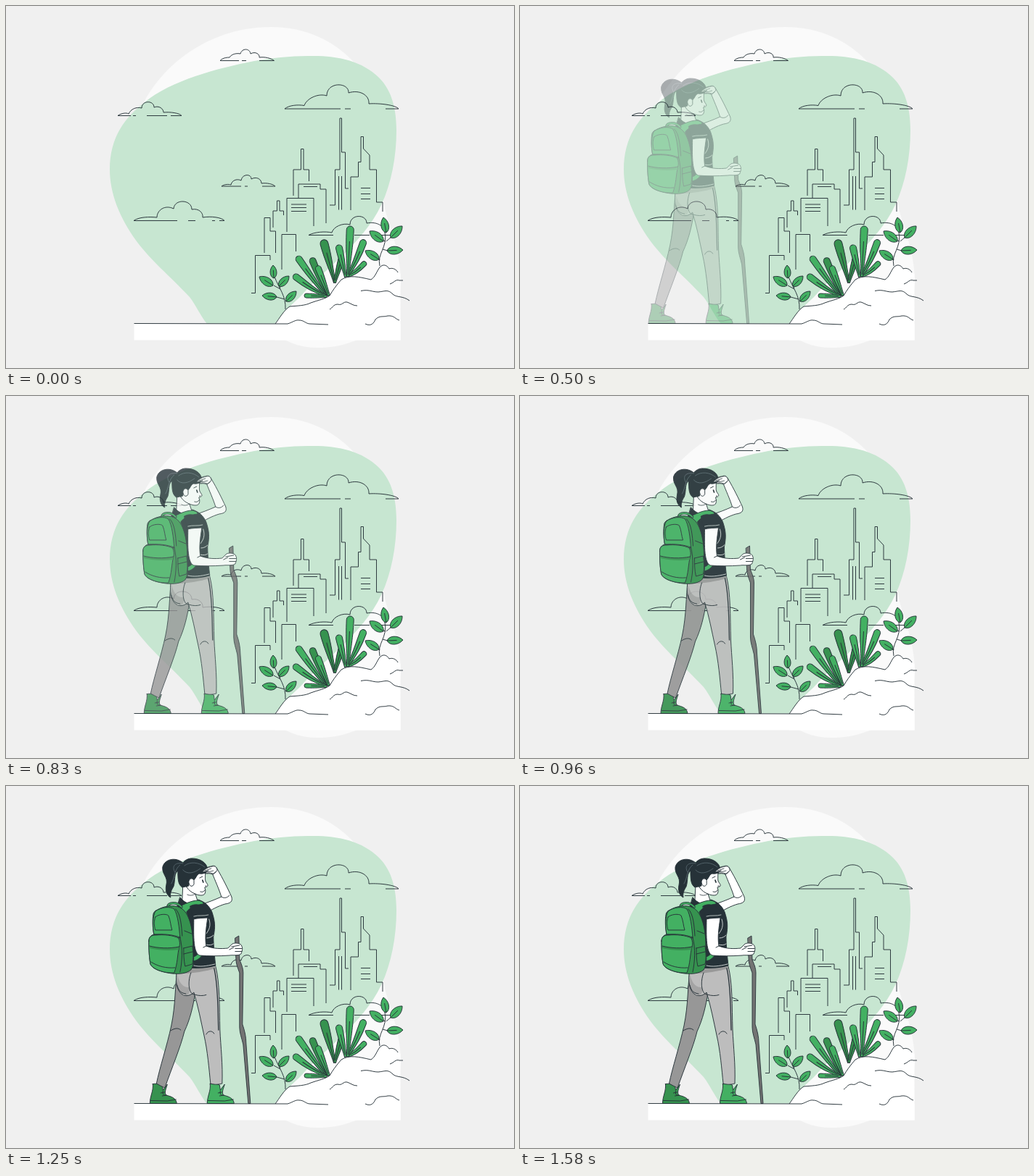
An HTML page with a canvas for the animation above (1620 ms loop, 700 by 500 pixels).

```html
<!DOCTYPE html>
<html lang="en">
<head>
<meta charset="utf-8">
<title>Hiker looking at the city</title>
<style>
html, body { margin: 0; width: 100%; height: 100%; overflow: hidden; background: #f0f0f0; }
canvas { display: block; width: 700px; height: 500px; }
</style>
</head>
<body>
<canvas id="stage" width="700" height="500"></canvas>
<script>
const INK = '#263238', GREEN = '#43b062', DEEP = '#36924f', SKIN = '#ffffff';
const LOOP = 1620, STEP = 1000 / 24, LAST = 38, SLIDE = 30;

function makeLayer() {
  const canvas = document.createElement('canvas');
  canvas.width = 700;
  canvas.height = 500;
  return canvas.getContext('2d');
}

function fill(c, d, color) {
  c.fillStyle = color;
  c.fill(new Path2D(d));
}

function line(c, d, color = INK, width = 0.95) {
  c.strokeStyle = color;
  c.lineWidth = width;
  c.stroke(new Path2D(d));
}

function shape(c, d, color, width = 0.95) {
  fill(c, d, color);
  line(c, d, INK, width);
}

// Pointed leaf with a midrib, from base to tip.
function leaf(c, bx, by, tx, ty) {
  const dx = tx - bx, dy = ty - by, k = 0.33;
  const point = (along, side) => `${bx + dx * along - dy * k * side} ${by + dy * along + dx * k * side}`;
  shape(c, `M${bx} ${by}C${point(0.15, 1)} ${point(0.7, 1)} ${tx} ${ty}` +
    `C${point(0.7, -1)} ${point(0.15, -1)} ${bx} ${by}Z`, GREEN);
  line(c, `M${bx} ${by}L${bx + dx * 0.62} ${by + dy * 0.62}`);
}

// Club-shaped blade with a round tip of radius r, bowed sideways by bend.
function blade(c, bx, by, tx, ty, r, bend = 0, color = GREEN) {
  const len = Math.hypot(tx - bx, ty - by), end = len - r;
  c.save();
  c.translate(bx, by);
  c.rotate(Math.atan2(ty - by, tx - bx));
  shape(c, `M0 -1.5C${len * 0.3} ${bend - 2} ${len * 0.5} ${bend - r} ${end} ${-r}` +
    `A${r} ${r} 0 0 1 ${end} ${r}C${len * 0.5} ${bend + r} ${len * 0.3} ${bend + 2} 0 1.5Z`, color);
  line(c, `M3 0Q${len * 0.4} ${bend} ${len * 0.7} ${bend * 0.5}`);
  c.restore();
}

function drawBackdrop(c) {
  c.fillStyle = '#f0f0f0';
  c.fillRect(0, 0, 700, 500);
  fill(c, 'M190 133C220 76 285 29 365 29C415 29 452 49 478 76C514 114 518 180 519 255' +
    'C520 295 541 320 544 375C546 432 492 472 430 472C408 472 393 466 380 459L250 350Z', '#fafafa');
  fill(c, 'M416 69C455 68 490 75 514 99C532 117 538 143 538 172C538 208 531 245 517 275' +
    'C493 327 437 365 405 402C389 416 379 428 370 439H277C268 428 261 412 253 402' +
    'C224 371 201 353 180 325C156 292 143 258 143 226C143 181 164 154 191 133' +
    'C227 103 291 86 342 76C366 72 391 69 416 69Z', '#c7e6d1');
}

function drawClouds(c) {
  [
    'M321 75.500H295C299 71 306 71 308 71C311 66 318 65 323 66C325 58 336 58 337 66' +
      'C344 62 350 67 349 71C357 70 365 72 369.500 75.500H349M325 75.500H331',
    'M172 151.500H154C159 148 166 147 169 149C172 142 180 139 187 141C187 130 204 130 204 140' +
      'C211 137 217 142 217 147C227 146 239 148 242 151.500H227M175 151.500H179M194 151.500H222',
    'M461 142H384C390 137 402 136 411 137.500C414 128 430 120 442 124C442 104 473 105 472 120' +
      'C487 115 501 123 500 135C516 134 537 137 541 142H523M467 142H475',
    'M324 249H297C301 246 307 246 310 247C311 241 318 238 324 241C325 232 338 231 338 239' +
      'C345 235 352 239 352 245C360 244 368 246 371 249H353M329 249H333',
    'M236 296.500H176C184 291 198 291 208 292C208 282 219 274 231 280C232 266 256 267 256 281' +
      'C266 279 272 286 271 292C283 290 297 292 301 296.500H294M251 296.500H261M284 296.500H288',
    'M451 316.500H417C425 312 440 311 449 313C451 305 464 299 474 302C474 287 497 287 497 300' +
      'C512 297 522 305 522 313M480 316.500H501M517 316.500H530'
  ].forEach(d => line(c, d));
}

function drawCity(c) {
  [
    'M338 396.500H343.500V344.500H364V351', 'M356 341V292.500H364V311H371.500V341',
    'M368 306V283H373.500V269H377V283H382.500V289', 'M380 364V315.500H399.500V339',
    'M387 312V265.500H424V304', 'M393 274H414M393 278.500H414M393 283.500H414',
    'M396 262V226H406.500V197.500H410V226H417.500V242',
    'M403 265V246H433V253H441V300M410 249.500H429',
    'M446 275H453.500V226H460V155H462.500V202H467.500V252H472M458.500 235V281.500M462.500 235V281.500',
    'M475 282V236H485.500V215.500H489V180.500H492.500V197L501 206V226H510.500V271H519V284',
    'M489 251.500H502M489 259.500H502M489 266.500H502'
  ].forEach(d => line(c, d));
}

function drawGround(c) {
  const ridge = 'M371 439C377 431 383 420 391 415C402 414 412 414 420 410C431 406 439 405 446 400' +
    'C450 393 455 386 462 378C473 371 486 374 503 378C509 374 511 366 515 361' +
    'C520 355 526 359 528 363C533 361 538 364 540 368';
  fill(c, ridge + 'L543.500 370V461.500H371Z', '#fff');
  c.fillStyle = '#fff';
  c.fillRect(176.500, 438.500, 367, 23);
  [
    ridge, 'M176.500 438.500L388 439C395 437 399 433 404 434C411 434 413 439 419 439L444 440',
    'M446 419C450 417 451 412 457 412C464 414 464 408 470 409C476 411 478 414 484 414',
    'M489 393.500C500 391 504 395 513 395C523 394 526 391 533 398C538 403 547 400 556 407',
    'M529 384C535 382 537 377 542 379L547 379',
    'M495 439C503 443 507 438 509 433C515 427 519 430 526 428C535 427 537 433 542 434'
  ].forEach(d => line(c, d));
}

function drawPlants(c) {
  line(c, 'M385 419C386 400 376 390 370 374M378 391L369 386M377 390L379 386M384 405L373 402M385 408L389 405');
  leaf(c, 369, 376, 368, 358);
  leaf(c, 368, 386, 349, 374);
  leaf(c, 376, 387, 390, 373);
  leaf(c, 373, 402, 353, 400);
  leaf(c, 386, 408, 400, 394);

  line(c, 'M515 359C511 341 526 335 522 312M523 325L520 324M524 325L531 319M519 336L526 338M515 351L514 349');
  leaf(c, 524, 313, 520, 292);
  leaf(c, 530, 320, 546, 304);
  leaf(c, 520, 325, 501, 311);
  leaf(c, 525, 338, 547, 337);
  leaf(c, 514, 350, 495, 338);

  blade(c, 442, 400, 421, 348, 4.500, 0, DEEP);
  blade(c, 453, 382, 437, 323, 5.500, 0, DEEP);
  blade(c, 453, 382, 463, 346, 4, 0, DEEP);
  blade(c, 470, 374, 494, 323, 4.500, 2);
  blade(c, 470, 374, 496, 354, 3.500, 2);
  blade(c, 468, 374, 458, 330, 4.500);
  blade(c, 471, 374, 474.500, 304, 5);
  blade(c, 441, 400, 401, 346, 4.500, -1);
  blade(c, 440, 400, 396, 372, 4.500, -2);
  blade(c, 442, 401, 411, 400, 3);
  blade(c, 445, 400, 429, 359, 4);
}

function drawBoot(c, x, color) {
  c.save();
  c.translate(x, 0);
  shape(c, 'M4 411.500C7 411 13 411 17 413L18 420L24 412C22 419 20 422 22 427C30 429 36 431 37 438.500H0' +
    'C0 428 5 422 4 411.500Z', color);
  line(c, 'M1 434.500L24 435L36 433M18 421C17 426 19 428 22 427M15 424L20 423M17 428L23 427');
  c.restore();
}

function drawLegs(c) {
  drawBoot(c, 196.500, DEEP);
  drawBoot(c, 275.500, GREEN);
  shape(c, 'M234 255C231 276 232 302 226 331C220 359 210 389 205.500 411C209 413 213 415 217 417' +
    'C226 391 239 360 244 339C252 322 256 304 259 286Z', '#979797');
  shape(c, 'M234 254C231 268 233 285 243 289C249 291 254 288 257 285C263 304 267 326 271 344' +
    'C276 366 278 391 280 411C286 413 292 412 296 411C297 384 294 360 293 337' +
    'C292 303 293 273 287 249Z', '#bdbdbd');
  fill(c, 'M234 255L287 249V252C273 256 251 260 234 259Z', '#999');
  fill(c, 'M234 260C234 275 234 282 243 289C250 290 252 286 251 278C242 279 237 272 234 260Z', '#a4a4a4');
  line(c, 'M253 258C248 271 250 288 258 288C264 290 270 290 274 288.500M234 275C236 284 240 286 246 287');
  line(c, 'M285 252C291 278 290 310 291 337', INK, 1.300);
  line(c, 'M274 343C277 337 283 338 285 342M225 338C231 334 236 334 239 337');
}

function drawHead(c) {
  shape(c, 'M242 136L241 157C248 164 256 164 262 158L259 149Z', SKIN);
  shape(c, 'M249 113C254 109 266 109 271 115C274 120 272 127 273 131C274 134 277 136 276 138' +
    'C275 140 272 139 272 140L273 144C273 148 272 151 267 151C260 151 249 145 247 139Z', SKIN);
  shape(c, 'M242 106C233 98 217 100 214 112C213 123 222 125 219 137C217 146 221 152 225 154' +
    'C224 148 226 144 229 139C232 130 229 122 235 117C235 128 235 136 241 140' +
    'L250 138C250 131 253 128 257 130C261 126 261 122 265 121C271 122 276 119 276 115' +
    'C275 106 266 100 254 100C249 100 244 103 242 106Z', INK);
  shape(c, 'M257 130C255 126 250 128 250 133C251 139 255 140 257 136Z', SKIN);
  line(c, 'M242 107C231 105 226 111 231 119M238 109C230 115 231 126 226 135M244 110C252 104 264 105 272 112' +
    'M242 116C248 123 258 120 266 114', '#64757b', 0.7);
  line(c, 'M266 146C269 147 271 146 272 144M265 127L269 125M273 138L274 138');
  line(c, 'M269 130L270 133', INK, 1.700);
  line(c, 'M248 150C252 152 256 151 259 149', INK, 0.8);
}

function drawRaisedArm(c) {
  shape(c, 'M268 119C272 114 277 111 281 111C285 109 288 111 290 116C296 126 304 142 309 153' +
    'C311 160 307 162 300 163C290 166 281 171 275 175L266 164C276 161 286 157 295 153' +
    'C292 143 286 130 283 122C279 120 276 121 273 121L276 118Z', SKIN);
  line(c, 'M283 122C285 121 287 120 288 118M295 153C299 156 304 154 306 151');
}

function drawRaisedHand(c) {
  shape(c, 'M269 119C272 114 278 112 283 111C287 110 289 113 289 117L284 121C279 119 276 121 273 120L277 117Z', SKIN, 0.8);
  line(c, 'M272 117L281 114M276 119L284 117', INK, 0.8);
}

function drawTorso(c) {
  shape(c, 'M238 154C245 161 253 163 263 157C272 160 278 165 282 174C286 186 287 194 284 208' +
    'C284 222 286 239 287 248C277 251 264 252 253 251L242 235L230 180Z', INK);
  line(c, 'M257 248C265 250 274 249 286 246M275 210C279 210 282 208 284 206M273 219C278 220 282 220 284 218' +
    'M278 184C281 193 278 199 274 204M240 155C246 160 255 162 262 157', '#eef3f0', 0.8);
}

function drawStick(c) {
  shape(c, 'M314 210L319 207L320 240C323 247 325 252 325 258L324 329C327 338 329 346 329 355' +
    'L335 438.500H332L325 357C323 348 320 341 320 333V258C317 250 315 245 315 238Z', '#737373', 0.9);
}

function drawFrontArm(c) {
  shape(c, 'M257 181L276 182C274 197 272 208 274 221C284 225 295 225 304 224L310 218' +
    'C314 216 322 217 323 221C325 225 323 229 322 232C318 235 310 233 306 234' +
    'C291 235 277 235 265 234C255 230 257 201 257 181Z', SKIN);
  line(c, 'M309 222L320 220M314 224.500H323M314 228.500H323M306 226L312 223M274 221L270 223');
  shape(c, 'M252 166C262 160 275 166 279 181C271 183 263 182 256 184Z', INK);
  line(c, 'M257 180C263 178 271 180 277 178', '#d5ded9', 0.8);
}

function drawPack(c) {
  shape(c, 'M255 236C260 236 262 232 266 229L269 233C266 238 260 242 255 242Z', GREEN);
  shape(c, 'M236 167C244 163 254 158 263 158C268 159 271 161 270 163C260 164 250 169 247 174' +
    'C251 184 254 196 254 210L244 196Z', GREEN);
  line(c, 'M221 167C222 160 234 160 240 167', INK, 3.500);
  line(c, 'M221 167C222 160 234 160 240 167', GREEN, 1.800);
  shape(c, 'M205 172C214 166 230 163 238 168C251 174 256 198 256 222C257 235 258 247 253 254' +
    'C247 259 237 260 227 259C211 257 198 252 197 245C195 234 195 220 195 214' +
    'C195 209 198 206 202 205C200 195 200 184 201 178C201 175 203 173 205 172Z', DEEP);
  shape(c, 'M204 173C212 167 225 166 230 170C235 178 237 196 238 210L202 205' +
    'C200 195 200 180 204 173Z', GREEN);
  shape(c, 'M195 214C195 208 199 206 204 206C216 205 228 206 236 210C238 215 238 219 237 222' +
    'C234 234 235 244 230 258C215 259 198 252 197 245C195 233 195 222 195 214Z', GREEN);
  fill(c, 'M196 221C207 224 223 225 237 222L236 226C223 228 209 227 196 224Z', DEEP);
  line(c, 'M196 221C207 224 223 225 237 222M198 243C207 249 219 252 231 251M202 205C214 204 227 205 238 209');
  line(c, 'M204 181C208 177 219 176 222 179C225 186 225 193 227 199L204 199C202 193 202 186 204 181Z' +
    'M232 170C239 177 240 193 241 207M238 209C242 225 241 243 238 257');
  shape(c, 'M243 224L255 221C256 229 257 238 255 246L245 249C243 241 243 231 243 224Z', DEEP);
  line(c, 'M243 232L255 229M244 200L254 204');
}

function drawHiker(c) {
  drawStick(c);
  drawLegs(c);
  drawRaisedArm(c);
  drawTorso(c);
  drawHead(c);
  drawRaisedHand(c);
  drawPack(c);
  drawFrontArm(c);
}

// Overshooting ease: cubic-bezier(.36, -.01, .5, 1.38).
function ease(x) {
  const bezier = (s, a, b) => 3 * (1 - s) ** 2 * s * a + 3 * (1 - s) * s * s * b + s ** 3;
  let low = 0, high = 1;
  for (let i = 0; i < 24; i++) {
    const mid = (low + high) / 2;
    if (bezier(mid, 0.36, 0.5) < x) low = mid; else high = mid;
  }
  return bezier(low, -0.01, 1.38);
}

const stage = document.getElementById('stage').getContext('2d');
const scene = makeLayer(), hiker = makeLayer();
[drawBackdrop, drawClouds, drawCity, drawPlants, drawGround].forEach(draw => draw(scene));
hiker.lineJoin = hiker.lineCap = 'round';

function render(time) {
  const step = Math.min(LAST, Math.floor((time % LOOP + 4) / STEP));
  stage.drawImage(scene.canvas, 0, 0);
  if (step >= 4) {
    const progress = ease(step / LAST);
    hiker.clearRect(0, 0, 700, 500);
    hiker.save();
    hiker.translate(SLIDE * (progress - 1), 0);
    drawHiker(hiker);
    hiker.restore();
    stage.globalAlpha = Math.min(1, progress);
    stage.drawImage(hiker.canvas, 0, 0);
    stage.globalAlpha = 1;
  }
}

const start = performance.now();
function tick() {
  render(performance.now() - start);
  requestAnimationFrame(tick);
}
tick();
</script>
</body>
</html>
```
